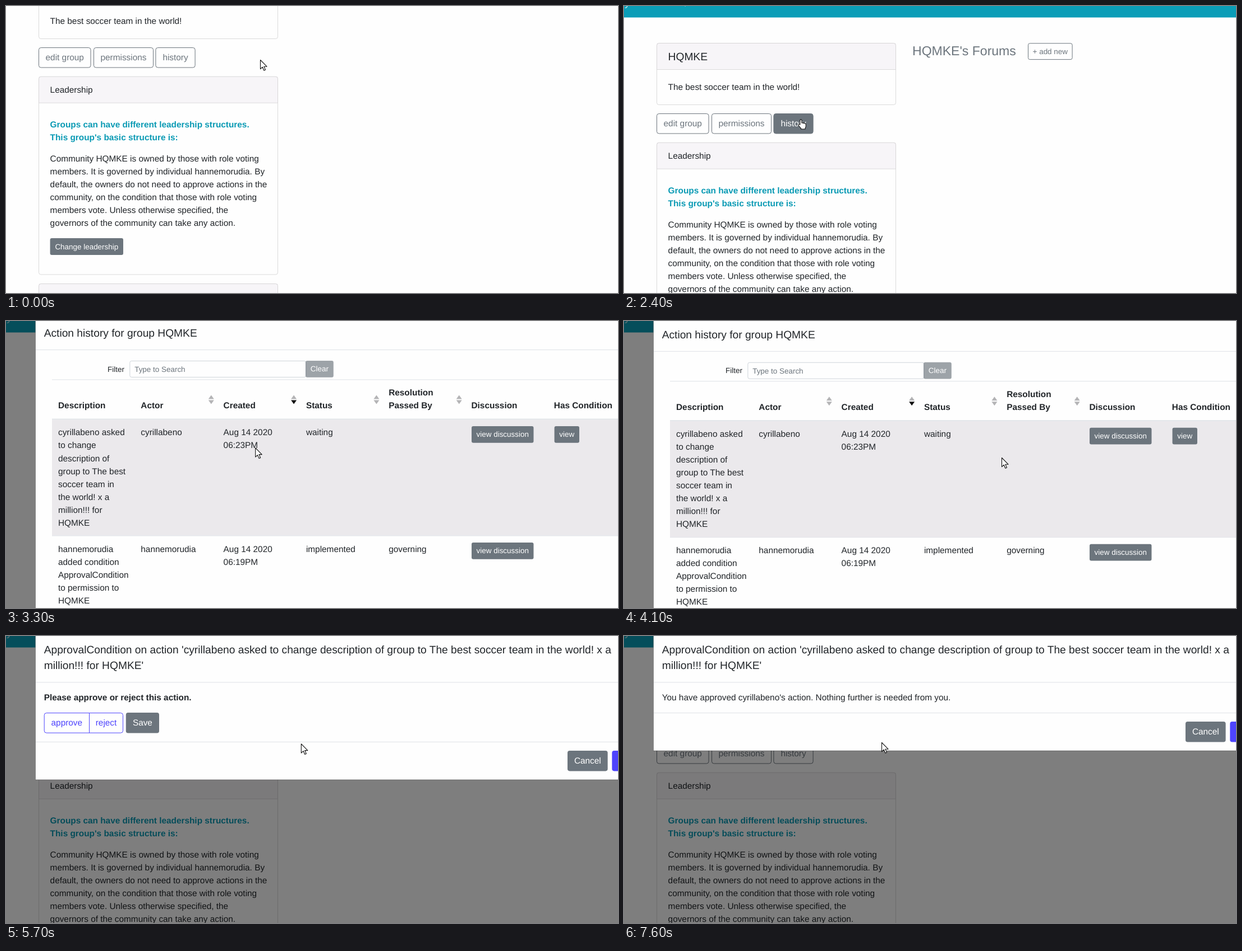
Write an HTML page that moves like this. It is 1091x513 px and loops after 8000 ms.

```html
<!DOCTYPE html>
<html lang="en">
<head>
<meta charset="utf-8">
<title>Group action history</title>
<style>
  html, body { margin: 0; width: 100%; height: 100%; overflow: hidden; background: #fefefe; }
  svg { display: block; width: 1091px; height: 513px; cursor: default; }
  text { font-family: "Liberation Sans", Arial, sans-serif; font-size: 15.36px; fill: #212529;
         text-rendering: geometricPrecision; }
  .h { font-size: 19.2px; }
  .b { font-weight: bold; }
  .s, .small text { font-size: 13.44px; }
  .teal { fill: #0a9ab4; }
  .forum { font-size: 23.04px; fill: #6c757d; }
  .hint { fill: #6c757d; }
  .line { fill: #dee2e6; }
  .mid text { text-anchor: middle; }
  .outline .face { fill: transparent; stroke: #6c757d; }
  .outline text { fill: #6c757d; }
  .solid .face { fill: #6c757d; }
  .solid text, .primary.hot text, .outline.hot text { fill: #fff; }
  .solid.hot .face { fill: #5a6268; }
  .solid.down .face { fill: #545b62; }
  .outline.hot .face { fill: #6c757d; }
  .primary .face { fill: #fefefe; stroke: #4e44fd; }
  .primary text { fill: #4e44fd; }
  .primary.hot .face { fill: #4e44fd; }
  .ring { fill: none; stroke: #6c757d; stroke-opacity: .5; stroke-width: 3; }
  .ring.blue { stroke: #4e44fd; }
  #pointer path { fill: #fff; stroke: #111; stroke-width: 1.1; stroke-linejoin: round; }
</style>
</head>
<body>
<svg id="stage" viewBox="0 0 1091 513" xmlns="http://www.w3.org/2000/svg"></svg>
<script>
const LOOP = 8000, STEP = 100, LEAD = 23.04, GAP = 15.36, BTN = 36.5;
const TEAM = 'HQMKE', OWNER = 'hannemorudia', PLAYER = 'cyrillabeno';

const group = (id, ...parts) => `<g id="${id}">${parts.join('')}</g>`;
const text = (x, y, str, cls = '') => `<text x="${x}" y="${y}" class="${cls}">${str}</text>`;
const lines = (x, y, list, cls, lead = LEAD) =>
  list.map((str, i) => text(x, y + i * lead, str, cls)).join('');
const rect = (x, y, w, h, attrs = '') =>
  `<rect x="${x}" y="${y}" width="${w}" height="${h}" ${attrs}/>`;
const rule = (x, y, h = 1) => rect(x, y, 1100 - x, h, 'class="line"');
const ring = (id, x, y, w, cls = '') =>
  rect(x - 1.5, y - 1.5, w + 3, BTN + 3, `id="${id}" class="ring ${cls}" rx="5"`);

function button(id, x, y, w, label, cls) {
  const small = cls.includes('small');
  const inset = cls.includes('outline') ? .5 : 0;
  const h = small ? 29.8 : BTN;
  return `<g id="${id}" class="mid ${cls}">` +
    rect(x + inset, y + inset, w - 2 * inset, h - 2 * inset, `class="face" rx="${small ? 3 : 3.8}"`) +
    text(x + w / 2, y + (small ? 19.4 : 23.2), label) + '</g>';
}

function card(y, h) {
  return rect(58.5, y, 426, 47, 'fill="#f7f5f8"') + rect(59, y + 46.5, 425, 1, 'fill="#000" opacity=".125"') +
    rect(58.5, y, 426, h, 'rx="3.8" fill="none" stroke="#000" stroke-opacity=".14"');
}

function sorter(x, active) {
  const tri = (y, d, color) => `<path d="M${x - 5} ${y}h10l-5 ${d}z" fill="${color}"/>`;
  return tri(142.2, -7, '#b4b4b6') + tri(144.3, 7, active ? '#111' : '#b4b4b6');
}

const page = group('page',
  rect(0, -60, 1091, 80.5, 'fill="#0a9db7"'),
  '<g opacity=".75">' + text(1, -.5, '<tspan fill="#fff">y</tspan>', 'h') +
    text(107, -1.5, '<tspan fill="#fff">,</tspan>') + '</g>',
  card(66.5, 110), text(78.6, 97, TEAM, 'h'),
  text(78.6, 149.9, 'The best soccer team in the world!'),
  button('edit', 58, 192, 93.5, 'edit group', 'outline'),
  button('perm', 156, 192, 107, 'permissions', 'outline'),
  button('hist', 266.4, 192, 71.2, 'history', 'outline'),
  ring('histRing', 266.4, 192, 71.2),
  card(244.2, 353.8), text(78.6, 272.8, 'Leadership'),
  lines(78.6, 334.9, ['Groups can have different leadership structures.',
    "This group's basic structure is:"], 'b teal'),
  lines(78.6, 396, [
    `Community ${TEAM} is owned by those with role voting`,
    `members. It is governed by individual ${OWNER}. By`,
    'default, the owners do not need to approve actions in the',
    'community, on the condition that those with role voting',
    'members vote. Unless otherwise specified, the',
    'governors of the community can take any action.']),
  button('lead', 78.6, 533.1, 130.4, 'Change leadership', 'solid small'),
  card(614.5, 200),
  text(514, 87.8, `${TEAM}'s Forums`, 'forum'),
  button('add', 720, 66.3, 79.6, '+ add new', 'outline small'));

const col = i => 93 + 147.3 * i;
const cells = (y, list) => list.map((c, i) => lines(col(i), y, c)).join('');

const historyView = group('history',
  text(67.7, 30.6, `Action history for group ${TEAM}`, 'h'), rule(53, 53.8),
  text(181, 93.3, 'Filter', 's'),
  rect(220.8, 74.2, 314, 29, 'rx="3" fill="#fefefe" stroke="#ced4da"'),
  text(229.2, 93.8, 'Type to Search', 's hint'),
  '<g opacity=".66">' + button('clear', 534, 73.7, 49.8, 'Clear', 'solid small') + '</g>',
  rule(82, 107.2),
  ['Description', 'Actor', 'Created', 'Status', 'Passed By', 'Discussion', 'Has Condition']
    .map((str, i) => text(col(i), 159.2, str, 'b') +
      (i > 1 && i < 6 ? sorter(col(i) - 21.8, i === 3) : '')).join(''),
  text(col(4), 159.2 - LEAD, 'Resolution', 'b'),
  rule(82, 177.4, 1.9),
  group('rows',
    rect(82, 179.3, 1009, 207, 'fill="#ebe9ec"'), rule(82, 386.2),
    cells(207.2, [
      [`${PLAYER} asked`, 'to change', 'description of', 'group to The best',
        'soccer team in', 'the world! x a', 'million!!! for', TEAM],
      [PLAYER], ['Aug 14 2020', '06:23PM'], ['waiting']]),
    cells(415.3, [
      [OWNER, 'added condition', 'ApprovalCondition', 'to permission to', TEAM],
      [OWNER], ['Aug 14 2020', '06:19PM'], ['implemented'], ['governing']]),
    button('talk1', 830, 190.8, 110.5, 'view discussion', 'solid small'),
    button('talk2', 830, 398.8, 110.5, 'view discussion', 'solid small'),
    button('view', 977.6, 190.8, 44.4, 'view', 'solid small')));

// One half of a joined pair, rounded on its outer side
function half(id, inner, w, label) {
  const s = Math.sign(w), run = w - 4 * s, sweep = w > 0 ? 1 : 0;
  return `<g id="${id}" class="mid primary"><path class="face" d="M${inner} 137.6h${run}` +
    `a4 4 0 0 ${sweep} ${4 * s} 4v27.6a4 4 0 0 ${sweep} ${-4 * s} 4h${-run}z"/>` +
    text(inner + w / 2, 160.3, label) + '</g>';
}

const approvalView = group('approval',
  lines(67.7, 30.6, [
    `ApprovalCondition on action '${PLAYER} asked to change description of group to The best soccer team in the world! x a`,
    `million!!! for ${TEAM}'`], 'h', 28.8),
  rule(53, 82.4),
  group('ask',
    text(67.7, 115, 'Please approve or reject this action.', 'b'),
    half('reject', 148.5, 60, 'reject'),
    half('approve', 148.5, -80.3, 'approve'),
    ring('approveRing', 68, 137.1, 80.8, 'blue'),
    button('save', 213.8, 137.1, 59.2, 'Save', 'solid'),
    ring('saveRing', 213.8, 137.1, 59.2)),
  group('done', text(67.7, 115,
    `You have approved ${PLAYER}'s action. Nothing further is needed from you.`)));

const footer = group('footer', rule(53, 0),
  button('cancel', 1001, 16, 71.6, 'Cancel', 'solid'),
  rect(1080.3, 16, 60, BTN, 'rx="3.8" fill="#4e44fd"'));

const pointer = group('pointer',
  '<path id="arrow" d="M.5 .5v16.2l3.7-3.5 2.7 6 2.6-1.2-2.7-5.8h5.2z"/>',
  '<path id="hand" d="M-1.3 9V1.4a1.5 1.5 0 0 1 3 0V6q1.6-.9 2.5.5 1.6-.8 2.4.6 2.3-.5 2.4 1.7V12q0 2-1.2 3.3V17H.4v-1.4Q-1.7 13.6-4.4 10q.1-2.3 3.1-1z"/>');

const stage = document.getElementById('stage');
stage.innerHTML = page + rect(0, 0, 1091, 513, 'id="shade"') +
  group('modal', rect(52.5, -20, 1100, 100, 'id="sheet" fill="#fefefe" stroke="#000" stroke-opacity=".3"'),
    historyView, approvalView, footer) + pointer;

const el = {};
stage.querySelectorAll('[id]').forEach(node => el[node.id] = node);

const TARGETS = ['hist', 'view', 'approve', 'reject', 'save'];
const bounds = {};
for (const id of TARGETS) bounds[id] = el[id].querySelector('.face').getBBox();

// Scene times
const SCROLL = 1300, OPEN = 3072, ROWS = 3300, APPROVAL = 4900, ASK = 5100,
  PICK = 6500, PRESS = 7000, SAVED = 7200, DONE = 7300;

// Pointer strokes: first step, last step, x, y, ease-out power
const STROKES = [
  [0, 0, 453, 96, 1], [700, 700, 718, 96, 1],
  [800, 800, 1109, 113, 1], [1800, 2500, 315, 203, 4],
  [3200, 3400, 475, 232, 1.5], [4100, 4100, 673, 244, 1], [4200, 4300, 886, 243, 1.5],
  [4500, 4700, 1004, 191, 1.5], [5200, 5500, 636, 201, 1],
  [5700, PICK, 111, 160, 2], [6700, 6800, 257, 160, 1], [7600, 7600, 459, 190, 1]];

const clamp = v => Math.min(1, Math.max(0, v));
const easeOut = (p, power) => 1 - (1 - p) ** power;
const show = (node, on) => node.style.display = on ? '' : 'none';
const move = (node, x, y) => node.setAttribute('transform', `translate(${x} ${y})`);

function pointerAt(t) {
  let x = 0, y = 0;
  for (const [from, to, toX, toY, power] of STROKES) {
    const k = easeOut(clamp((t - from + STEP) / (to - from + STEP)), power);
    x += (toX - x) * k;
    y += (toY - y) * k;
  }
  return [x, y];
}

function footerAt(t) {
  if (t < ROWS) return 210.8;
  if (t < APPROVAL) return 700;
  const body = t < ASK ? 0 : t < DONE ? LEAD + GAP + BTN : LEAD;
  return 114 + body;
}

function draw(t) {
  const [x, y] = pointerAt(t);
  const foot = footerAt(t);
  const asking = t >= ASK && t < DONE;
  const picked = t >= OPEN - STEP && t < APPROVAL;

  move(el.page, 0, t < SCROLL ? -118 : t < SCROLL + STEP ? -27 : 0);
  el.shade.setAttribute('opacity', .5 * clamp((t - OPEN + 5) / 150));
  el.modal.setAttribute('opacity', clamp((t - OPEN) / 150));
  move(el.modal, 0, 48 * (easeOut(clamp((t - OPEN) / 300), 2) - 1));
  move(el.footer, 0, foot);
  el.sheet.setAttribute('height', foot + 88);

  show(el.history, t < APPROVAL);
  show(el.rows, t >= ROWS);
  show(el.approval, t >= APPROVAL);
  show(el.ask, asking);
  show(el.done, t >= DONE);

  const active = {
    hist: t >= SCROLL + STEP && t < OPEN, view: t >= ROWS && t < APPROVAL,
    approve: asking, reject: asking, save: asking
  };
  const held = { hist: picked, approve: t >= PICK };
  let hand = false;
  for (const id of TARGETS) {
    const b = bounds[id];
    const over = active[id] && x >= b.x && x <= b.x + b.width && y >= b.y && y <= b.y + b.height;
    hand = hand || over;
    el[id].classList.toggle('hot', Boolean(over || held[id]));
  }
  el.save.classList.toggle('down', t >= PRESS);
  show(el.histRing, picked);
  show(el.approveRing, t >= PICK && t < SAVED);
  show(el.saveRing, t >= SAVED);

  move(el.pointer, x, y);
  show(el.arrow, !hand);
  show(el.hand, hand);
}

const start = performance.now();
function tick() {
  const t = (performance.now() - start) % LOOP;
  draw(Math.floor(t / STEP) * STEP);
  requestAnimationFrame(tick);
}
tick();
</script>
</body>
</html>
```
